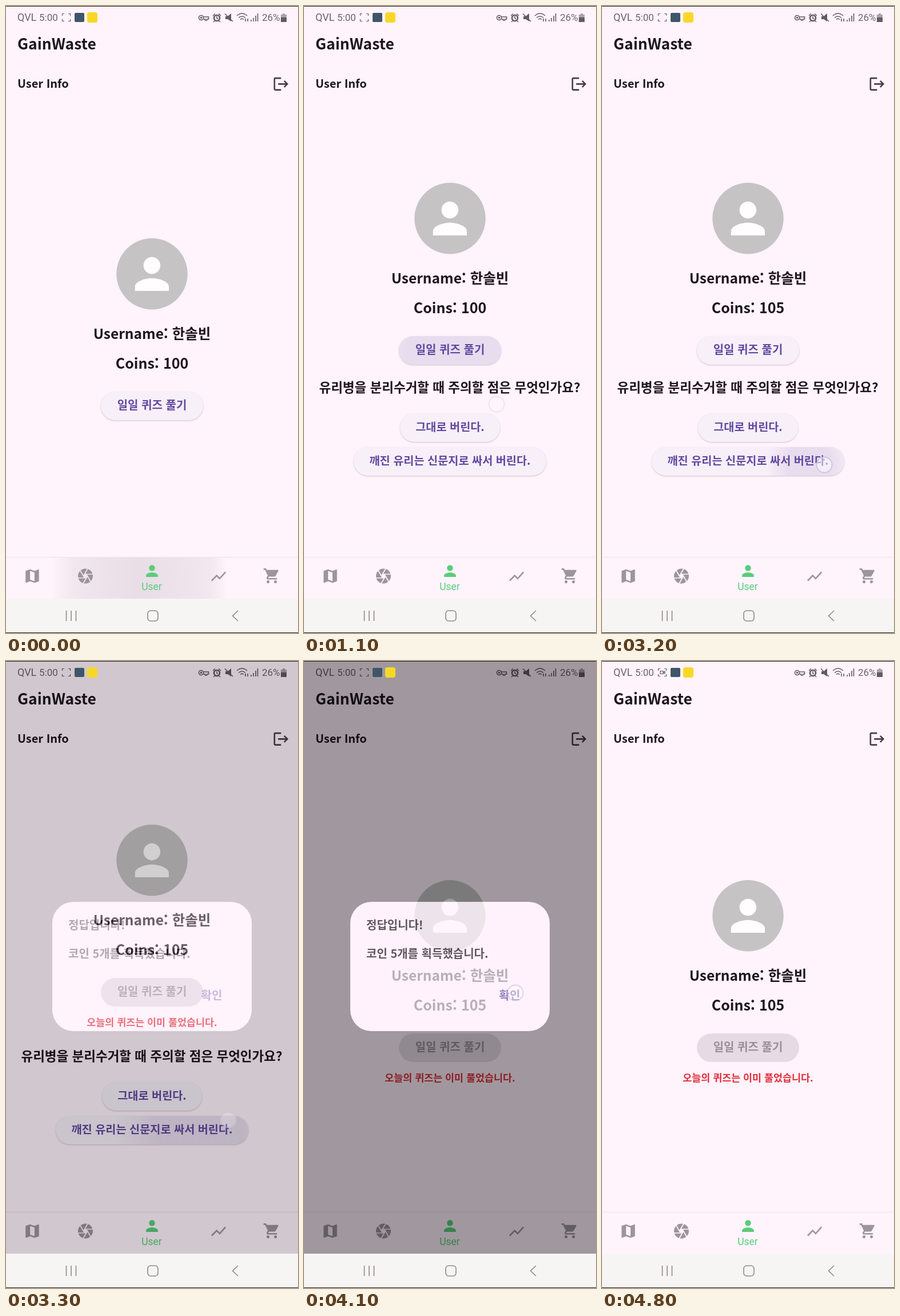
Animation of 511 by 1096 pixels, one loop 4900 ms. Source, as an HTML page:

```html
<!DOCTYPE html>
<html lang="ko">
<head>
<meta charset="utf-8">
<title>Quiz screen</title>
<style>
  html, body { margin: 0; width: 100%; height: 100%; overflow: hidden; background: #fff3fc; }
  svg { display: block; }
  text { font: 700 20px "Noto Sans CJK KR", "Noto Sans CJK JP", "Noto Sans CJK", sans-serif; fill: #1d161c; }
  .mid { text-anchor: middle; }
  .button { fill: #f7f0f9; filter: drop-shadow(0 1.3px .8px rgba(60, 40, 60, .25)); }
  .action { fill: #6149a0; }
  .status text { font: 400 17px Roboto, sans-serif; fill: #6b646b; }
  .line { fill: none; stroke: #625b62; stroke-width: 1.6; }
  .off .button { fill: #e6dbe4; filter: none; }
  .off .action { fill: #9a9099; }
</style>
</head>
<body>
<svg width="511" height="1096" viewBox="0 0 511 1096">
  <defs>
    <radialGradient id="soft">
      <stop offset=".5" stop-color="#7850a0" stop-opacity=".12"/>
      <stop offset="1" stop-color="#7850a0" stop-opacity="0"/>
    </radialGradient>
    <linearGradient id="tabGlow">
      <stop offset="0" stop-color="#9a8f99" stop-opacity="0"/>
      <stop offset=".12" stop-color="#9a8f99" stop-opacity=".13"/>
      <stop offset=".5" stop-color="#9a8f99" stop-opacity=".22"/>
      <stop offset=".9" stop-color="#9a8f99" stop-opacity=".13"/>
      <stop offset="1" stop-color="#9a8f99" stop-opacity="0"/>
    </linearGradient>
    <clipPath id="startClip"><rect x="166" y="674" width="179" height="50" rx="25"/></clipPath>
    <clipPath id="answerClip"><rect x="87" y="868" width="337" height="50" rx="25"/></clipPath>
    <path id="person" d="M12 12c2.21 0 4-1.79 4-4s-1.79-4-4-4-4 1.79-4 4 1.79 4 4 4zm0 2c-2.67 0-8 1.34-8 4v2h16v-2c0-2.66-5.33-4-8-4z"/>
  </defs>
  <rect width="511" height="1096" fill="#fff3fc"/>

  <g class="status">
    <text x="20" y="26" style="font-size:18px">QVL</text>
    <text x="58" y="26">5:00</text>
    <text x="448" y="26">26%</text>
    <path class="line" style="stroke-width:1.2" d="M102 13.500h-3.500v3.500M109 13.500h3.500v3.500M102 26.500h-3.500v-3.500M109 26.500h3.500v-3.500"/>
    <path id="recorder" class="line" style="stroke-width:1.2" d="M102 17.500h5v5h-5zM107 20l3-2v4z"/>
    <g class="line">
      <circle cx="341.5" cy="20.5" r="4"/>
      <circle cx="341.5" cy="20.5" r="1"/>
      <path d="M345.500 19h9v4h-3v2h-3v-2h-3"/>
      <circle cx="369" cy="21" r="5" style="stroke-width:2.6"/>
      <path d="M362 17l4-3.500M376 17l-4-3.500M369 18v3.500l2 1M365 26l-2 2M373 26l2 2"/>
      <path d="M383 13.500l14 13.500"/>
      <path d="M404 17q9-8 18 0M407 20.500q6-5 12 0M410 23.500q3-2.500 6 0M419 22v5M423 27v-5"/>
      <path d="M429 27v-3M433 27v-6M437 27v-10M440.500 27v-14"/>
    </g>
    <path d="M384 18h4l6-5v14l-6-4h-4z" fill="#625b62"/>
    <path d="M484 13h4v2h3v13h-10V15h3z" fill="#aaa2a9"/>
    <path d="M481 20h10v8h-10z" fill="#625b62"/>
  </g>

  <text x="20" y="76" style="font-size:26.500px">GainWaste</text>
  <text x="20" y="143">User Info</text>
  <path transform="translate(466 121) scale(1.28)" fill="#453e46" d="M17 7l-1.41 1.41L18.17 11H8v2h10.17l-2.58 2.58L17 17l5-5zM4 5h8V3H4c-1.1 0-2 .9-2 2v14c0 1.1.9 2 2 2h8v-2H4V5z"/>

  <g id="content">
    <circle cx="255.5" cy="468.3" r="62.2" fill="#c5c3c3"/>
    <use href="#person" transform="translate(211 424) scale(3.7)" fill="#fffdfd"/>
    <text class="mid" x="255.5" y="582" style="font-size:24.500px">Username: 한솔빈</text>
    <text id="coins" class="mid" x="255.5" y="634" style="font-size:25px"></text>
    <g id="start">
      <rect class="button" x="166" y="674" width="179" height="50" rx="25"/>
      <g clip-path="url(#startClip)"><circle id="startRipple" cy="696" fill="url(#soft)"/></g>
      <text class="mid action" x="255.5" y="705">일일 퀴즈 풀기</text>
    </g>
    <text id="notice" class="mid" x="255.5" y="757.500" style="font-size:17.400px;fill:#e02f3b">오늘의 퀴즈는 이미 풀었습니다.</text>
    <g id="quiz">
      <text class="mid" x="255" y="772" style="font-size:22.500px">유리병을 분리수거할 때 주의할 점은 무엇인가요?</text>
      <rect class="button" x="168" y="809" width="175" height="50" rx="25"/>
      <text class="mid action" x="255.5" y="840" style="font-size:19.700px">그대로 버린다.</text>
      <rect class="button" x="87" y="868" width="337" height="50" rx="25"/>
      <g clip-path="url(#answerClip)"><circle id="answerRipple" cy="897" fill="url(#soft)"/></g>
      <text class="mid action" x="255.5" y="899" style="font-size:19.700px">깨진 유리는 신문지로 싸서 버린다.</text>
    </g>
  </g>

  <g fill="#9c959c">
    <path d="M0 963.500H511" stroke="#f1e7ef" stroke-width="1.5"/>
    <rect id="tabRipple" x="80" y="964" width="306" height="72" fill="url(#tabGlow)"/>
    <path transform="translate(30.400 980.900) scale(1.3)" d="M20.5 3l-.16.03L15 5.100 9 3 3.360 4.900c-.21.07-.36.25-.36.48V20.500c0 .28.22.5.5.5l.16-.03L9 18.900l6 2.100 5.640-1.900c.21-.07.36-.25.36-.48V3.500c0-.28-.22-.5-.5-.5zM15 19l-6-2.110V5l6 2.110V19z"/>
    <path transform="translate(123.400 980.900) scale(1.3)" d="M9.400 10.500l4.770-8.260C13.470 2.090 12.750 2 12 2c-2.400 0-4.600.85-6.320 2.250l3.660 6.350.06-.1zM21.540 9c-.92-2.920-3.150-5.260-6-6.340L11.880 9h9.660zm.26 1h-7.490l.29.5 4.760 8.250C21 16.970 22 14.610 22 12c0-.69-.07-1.350-.2-2zM8.540 12l-3.900-6.750C3.010 7.030 2 9.390 2 12c0 .69.07 1.350.2 2h7.490l-1.150-2zm-6.080 3c.92 2.920 3.150 5.260 6 6.340L12.120 15H2.460zm11.270 0l-3.900 6.760c.7.15 1.420.24 2.170.24 2.400 0 4.600-.85 6.320-2.250l-3.660-6.350-.93 1.600z"/>
    <use href="#person" transform="translate(239.900 972) scale(1.3)" fill="#59ce7a"/>
    <text class="mid" x="255" y="1021" style="font:400 17.500px Roboto,sans-serif;fill:#59ce7a">User</text>
    <path transform="translate(356.400 981.400) scale(1.3)" d="M3.500 18.490l6-6.010 4 4L22 6.920l-1.410-1.410-7.090 7.970-4-4L2 16.990z"/>
    <path transform="translate(449.500 980.500) scale(1.3)" d="M7 18c-1.100 0-1.990.9-1.990 2S5.900 22 7 22s2-.9 2-2-.9-2-2-2zM1 2v2h2l3.600 7.590-1.350 2.450c-.16.28-.25.61-.25.96 0 1.100.9 2 2 2h12v-2H7.420c-.14 0-.25-.11-.25-.25l.03-.12.9-1.630h7.450c.75 0 1.410-.41 1.750-1.030l3.580-6.490A1 1 0 0 0 20 4H5.210l-.94-2H1zm16 16c-1.100 0-1.990.9-1.990 2s.89 2 1.990 2 2-.9 2-2-.9-2-2-2z"/>
  </g>

  <g id="dialog">
    <rect width="511" height="1036" fill="#000" opacity=".54"/>
    <rect x="81" y="421" width="349" height="226" rx="37" fill="#fff3fc"/>
    <text x="109" y="469">정답입니다!</text>
    <text x="109" y="519">코인 5개를 획득했습니다.</text>
    <text class="mid action" x="360" y="592">확인</text>
  </g>

  <rect x="120" y="12" width="17" height="16" rx="2" fill="#3f5668"/>
  <rect x="142" y="11" width="18" height="18" rx="4" fill="#f8d827"/>
  <rect y="1036" width="511" height="60" fill="#f7f5f4"/>
  <g class="line" style="stroke:#8d898a">
    <path d="M105.500 1057v18M114 1057v18M122.500 1057v18M406 1057l-9.500 9 9.500 9"/>
    <rect x="248" y="1057" width="18" height="18" rx="5"/>
  </g>
  <path d="M0 .5H511M0 1095.500H511" stroke="#242024"/>
  <circle id="touch" r="13.500" fill="#fff" fill-opacity=".5" stroke="#cfc5da" stroke-width="1.8"/>
</svg>
<script>
  const LOOP = 4900, STEP = 100, FADE = 150;
  const QUIZ_AT = 1000, COIN_AT = 3150, SOLVED_AT = 3300, CLOSED_AT = 4060;
  const BUTTON_CENTER = 255.5;
  const TOUCHES = [
    { x: 337, y: 696, from: 800, to: 1000 },
    { x: 389, y: 802, from: 3080, to: 3220 },
    { x: 370, y: 580, from: 3860, to: 4060 },
  ];

  const $ = id => document.getElementById(id);
  const clamp = v => Math.max(0, Math.min(1, v));
  const show = (id, opacity) => $(id).setAttribute("opacity", Number(opacity));
  const shift = (id, y) => $(id).setAttribute("transform", `translate(0 ${y})`);

  // The glow grows while drifting from the finger to the middle of the button.
  function ripple(id, touch, t) {
    const age = Math.max(0, t - touch.from);
    const drift = clamp(age / 600);
    $(id).setAttribute("cx", touch.x + (BUTTON_CENTER - touch.x) * drift);
    $(id).setAttribute("r", age && 25 + age * .25 + age * age * .0015);
    show(id, 1 - clamp((age - 300) / 400));
  }

  function draw(t) {
    const quizOpen = t >= QUIZ_AT && t < CLOSED_AT;
    const solved = t >= SOLVED_AT;

    shift("content", (quizOpen ? -97 : 0) - (solved ? 23 : 0));
    shift("quiz", solved ? 47 : 0);
    show("quiz", quizOpen);
    show("notice", solved);
    $("start").classList.toggle("off", solved);
    $("coins").textContent = `Coins: ${t >= COIN_AT ? 105 : 100}`;

    show("recorder", t % 1000 >= 500);
    show("tabRipple", 1 - clamp(t / 400));
    ripple("startRipple", TOUCHES[0], t);
    ripple("answerRipple", TOUCHES[1], t);
    show("dialog", Math.min(clamp((t - 3250) / FADE), 1 - clamp((t - CLOSED_AT) / 130)));

    const touch = TOUCHES.find(p => t >= p.from && t < p.to + FADE);
    show("touch", touch ? 1 - clamp((t - touch.to) / FADE) : 0);
    if (touch) {
      $("touch").setAttribute("cx", touch.x);
      $("touch").setAttribute("cy", touch.y);
    }
  }

  const begin = performance.now();
  function tick() {
    const t = (performance.now() - begin) % LOOP;
    draw(Math.floor(t / STEP) * STEP);
    requestAnimationFrame(tick);
  }
  tick();
</script>
</body>
</html>
```
